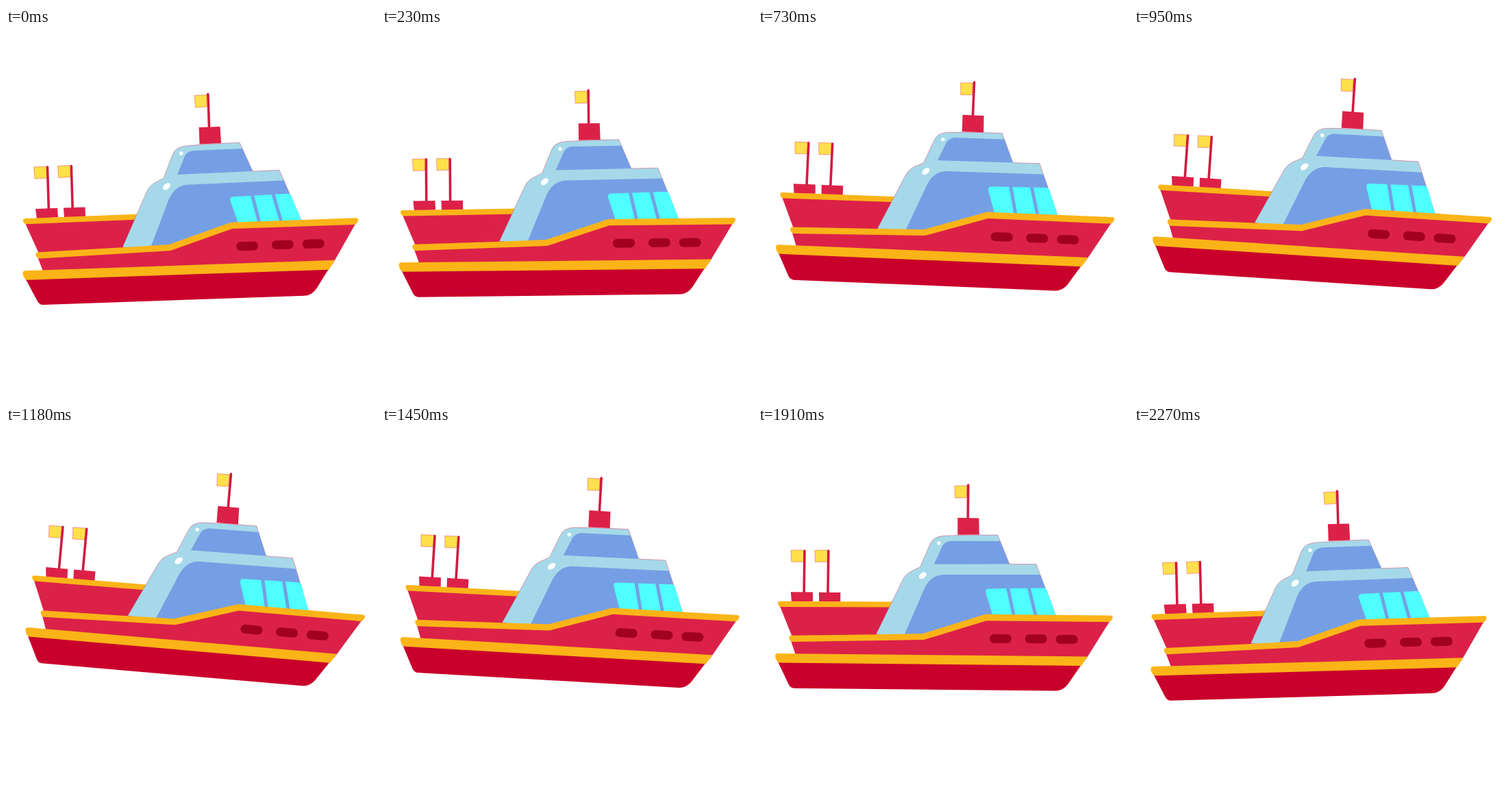
These frames come from a looping animation (540x540 px, 2.31 s). An HTML page:

```html
<!DOCTYPE html>
<html lang="en">
<head>
<meta charset="utf-8">
<title>Boat</title>
<style>
  html, body { margin: 0; width: 100%; height: 100%; overflow: hidden; background: #fff; }
  svg { display: block; width: 100%; height: 100%; }
  .red { fill: #dc2148; }
  .deep { fill: #c9002b; }
  .gold { fill: #fbb418; }
  .pale { fill: #a5d9e9; }
  .blue { fill: #759fe4; }
  .glass { fill: #4fffff; }
  .port { fill: #a2001f; }
  .flag { fill: #ffe04b; }
  .rim { stroke: #dc2148; stroke-opacity: .5; stroke-width: .8; }
  .pole { stroke: #d01c42; stroke-width: 3.6; stroke-linecap: round; }
</style>
</head>
<body>
<svg viewBox="0 0 540 540">
  <defs>
    <g id="mast">
      <path class="flag rim" d="M-20 1.500L-1 0.500V17.500L-18.500 18.500Z"/>
      <path class="pole" d="M0 1.500L1.800 62"/>
    </g>
    <rect id="hole" class="port" x="-16" y="-6.500" width="32" height="13" rx="6.300" transform="rotate(-2)"/>
  </defs>
  <g id="boat">
    <!-- stern masts -->
    <use href="#mast" x="60.500" y="201.500"/>
    <use href="#mast" x="95.300" y="200"/>
    <path class="red" d="M43 264L75 262.800L76 276L45 279ZM84 262.500L115.500 261.500L116 275L85 277Z"/>

    <!-- far hull -->
    <path class="red" d="M28 285L195 278V322L48 329Z"/>
    <path class="gold" d="M28 278L195 271.500V279.500L30 286.300Q27 286.300 25.500 283Q23.500 278.500 28 278Z"/>

    <!-- cabin -->
    <path class="pale rim" d="M170 320L204 242Q208 231 217 226L230 219L243 185Q247 174 262 172Q300 168.500 341 167.300L360 209L399 207.300L431 281L330 300L238 322Z"/>
    <path class="blue" d="M250 214L261 187Q265 179.500 274 179L345 176L360 209Z"/>
    <path class="blue" d="M211 320L238 249Q247 230 264 228.800L405.500 222.500L431 281L330 300L238 322Z"/>
    <path class="glass" d="M327.300 252Q326 246.700 332 246.200L411 241.800Q415 241.500 416.500 245L431 281L339 285Z"/>
    <path class="blue" d="M357 244.500L362 244.200L372 283H367ZM387.500 242.800L392.500 242.500L404 282H399Z"/>
    <ellipse cx="234.300" cy="231.300" rx="6.300" ry="4" fill="#fff" transform="rotate(-42 234.300 231.300)"/>
    <circle cx="255.700" cy="183" r="2.700" fill="#fff"/>

    <!-- funnel -->
    <path class="flag rim" d="M275 98.500L293 97.500V115L276.500 116Z"/>
    <path class="pole" d="M294.800 96.500L296.500 146"/>
    <path class="red" d="M281.500 145L312.500 144L314 168L282.500 169.500Z"/>

    <!-- near hull -->
    <path class="red" d="M46 334L240 322L330 290L511 284L477 344L56 360Z"/>
    <path class="gold" d="M46 327.300L170 320.300L238 316L328 283.700L511 277.300Q515.500 278 513.500 282Q512 286.500 508 287L330 293L240 325L49 336.500Q45.500 336.500 43.800 332Q42.500 328 46 327.300Z"/>
    <path class="deep" d="M28 365L472 350L453 380.500Q446 390.300 436 390.700L54 404Q49 404 46 399Z"/>
    <path class="gold" d="M28 354.300L480 338.700L471.500 352.700L31 367.700Q27.500 367.500 25.500 362Q22.500 355 28 354.300Z"/>
    <use href="#hole" x="352" y="318.300"/>
    <use href="#hole" x="403.700" y="316.300"/>
    <use href="#hole" x="448.600" y="315"/>
  </g>
</svg>
<script>
  const boat = document.getElementById("boat");
  const LOOP = 2310, RATE = 22 / 1000, HALF = 25.7, SWING = 7;

  // The boat rocks in steps, at constant speed, about a point by the bow.
  function draw(ms) {
    const step = Math.min(50, Math.floor((ms % LOOP + 5) * RATE));
    const lift = 1 - Math.abs(1 - step / HALF);
    boat.setAttribute("transform", `rotate(${SWING * lift} 530 361)`);
  }

  const start = performance.now();
  function tick() {
    draw(performance.now() - start);
    requestAnimationFrame(tick);
  }
  draw(0);
  requestAnimationFrame(tick);
</script>
</body>
</html>
```
